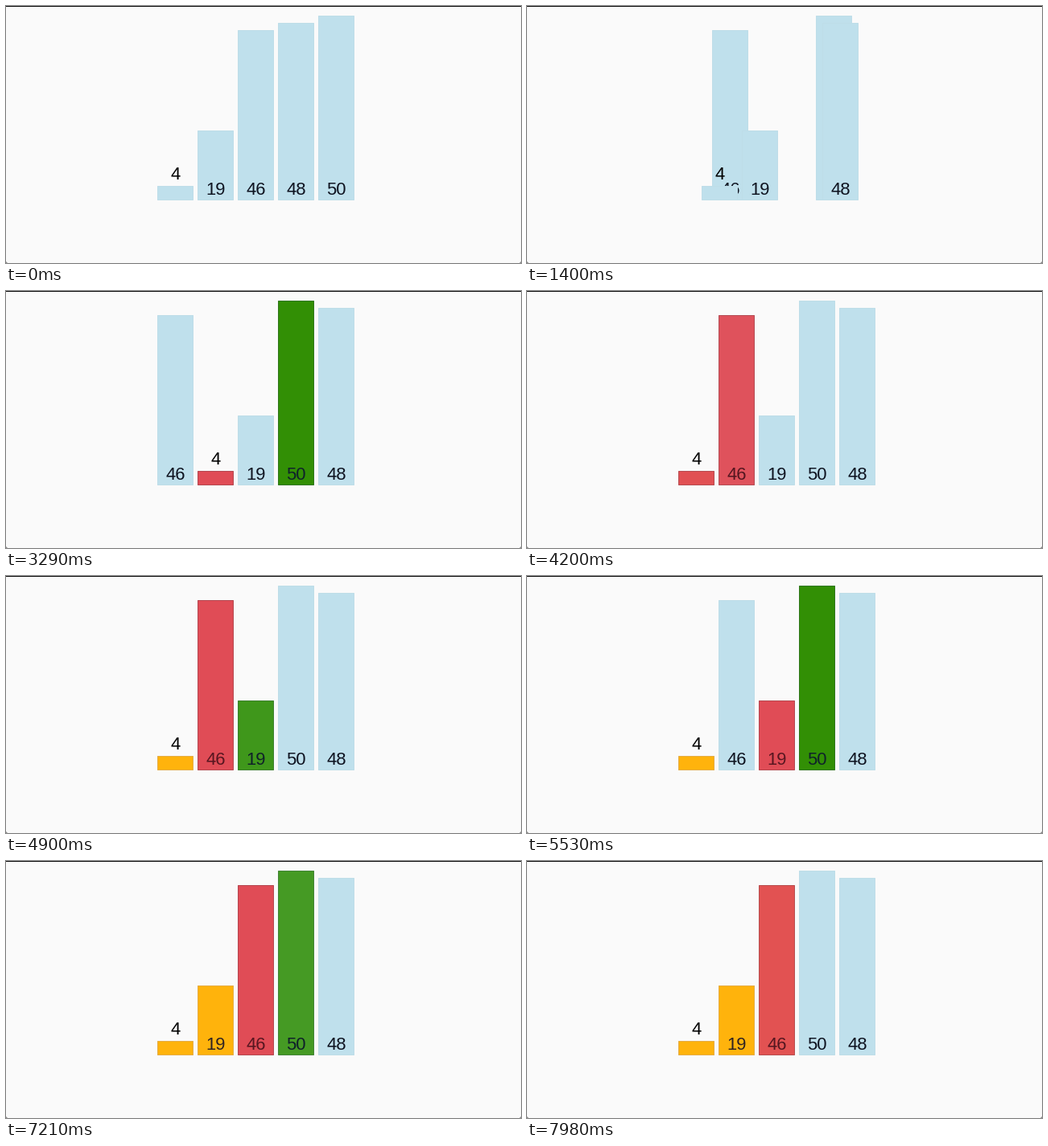
A matplotlib script for the animation above (8 s loop, 640 px wide and 320 px high).

```python
import numpy as np
import matplotlib.pyplot as plt
from matplotlib.animation import FuncAnimation
from matplotlib.patches import Polygon, Rectangle

W, H, DPI = 640, 320, 100
PX = 72 / DPI
LOOP, INTERVAL, STEP = 8000, 20, 70

LEFT, PITCH, BAR_W, BASE, UNIT = 188, 50, 45, 242, 4.6
SORTED, SHUFFLED = [4, 19, 46, 48, 50], [46, 4, 19, 50, 48]
MOVE, FADE = 500, 250

# fill, edge and label colour of each bar state
STYLE = {
    "plain": [(191, 224, 236), (190, 221, 232), (14, 19, 32)],
    "check": [(50, 143, 5), (48, 118, 28), (15, 34, 42)],
    "least": [(224, 76, 86), (180, 72, 80), (88, 22, 32)],
    "done": [(255, 179, 12), (228, 172, 70), (46, 34, 34)],
}
STYLE = {name: np.array(rows) / 255 for name, rows in STYLE.items()}


def selection_states(values, rounds):
    """Every step of selection sort as (order, marks)."""
    order, marks, states = list(values), {}, []

    def push():
        states.append((list(order), dict(marks)))

    for i in range(rounds):
        low = i
        marks[order[i]] = "least"
        push()
        for j in range(i + 1, len(order)):
            marks[order[j]] = "check"
            push()
            marks[order[j]] = "plain"
            if order[j] < order[low]:
                marks[order[low]] = "plain"
                low = j
                marks[order[low]] = "least"
                push()
        marks[order[i]] = "least"
        push()
        if low != i:
            order[i], order[low] = order[low], order[i]
            push()
        marks[order[low]] = "plain"
        marks[order[i]] = "done"
        push()
    return states


states = [(SORTED, {}), (SHUFFLED, {})] + selection_states(SHUFFLED, 3)
steps = np.arange(1, len(states) - 1)
starts = [0, 1136, *np.interp(steps, [1, 9, 16, 22], [1885, 4146, 6161, 7920])]


def ease(t):
    t = min(max(t, 0), 1)
    return 4 * t**3 if t < 0.5 else 1 - 4 * (1 - t) ** 3


def mix(a, b, k):
    return a + (b - a) * k


fig = plt.figure(figsize=(W / DPI, H / DPI), dpi=DPI, facecolor="#fafafa")
ax = fig.add_axes([0, 0, 1, 1])
ax.set(xlim=(0, W), ylim=(H, 0))
ax.axis("off")

ax.add_patch(Rectangle((0, 0), W, 1, fc="#0c0c0c", lw=0))
for x, side in ((0, 1), (W, -1)):
    ax.add_patch(Polygon([(x, H), (x + 2 * side, H), (x, H - 2)], fc="#8a8a8a", lw=0))

# The 1 px outline snaps to pixel centres, so each bar is drawn 1 px smaller.
bars, labels = {}, {}
for z, v in enumerate(SHUFFLED):
    height = v * UNIT
    bars[v] = ax.add_patch(Rectangle((0, BASE - height), BAR_W - 1, height - 1,
                                     lw=PX, joinstyle="miter", zorder=2 + 2 * z))
    baseline = 234.6 if v > 5 else 216
    labels[v] = ax.text(0, baseline, str(v), ha="center", va="baseline",
                        family="Liberation Sans", size=22 * PX, zorder=3 + 2 * z)


def draw(frame):
    now = (frame * INTERVAL + INTERVAL // 2) // STEP * STEP
    n = max(i for i, s in enumerate(starts) if s <= now)
    (old_order, old), (new_order, new) = states[max(n - 1, 0)], states[n]
    k = ease((now - starts[n]) / (MOVE if n == 1 else FADE))
    for v in SHUFFLED:
        x = LEFT + PITCH * mix(old_order.index(v), new_order.index(v), k)
        fill, edge, ink = mix(STYLE[old.get(v, "plain")], STYLE[new.get(v, "plain")], k)
        bars[v].set(x=x, facecolor=fill, edgecolor=edge)
        labels[v].set(x=x + BAR_W / 2, color=ink if v > 5 else "black")
    return [*bars.values(), *labels.values()]


anim = FuncAnimation(fig, draw, frames=LOOP // INTERVAL, interval=INTERVAL,
                     repeat=True, repeat_delay=0)
plt.show()
```
